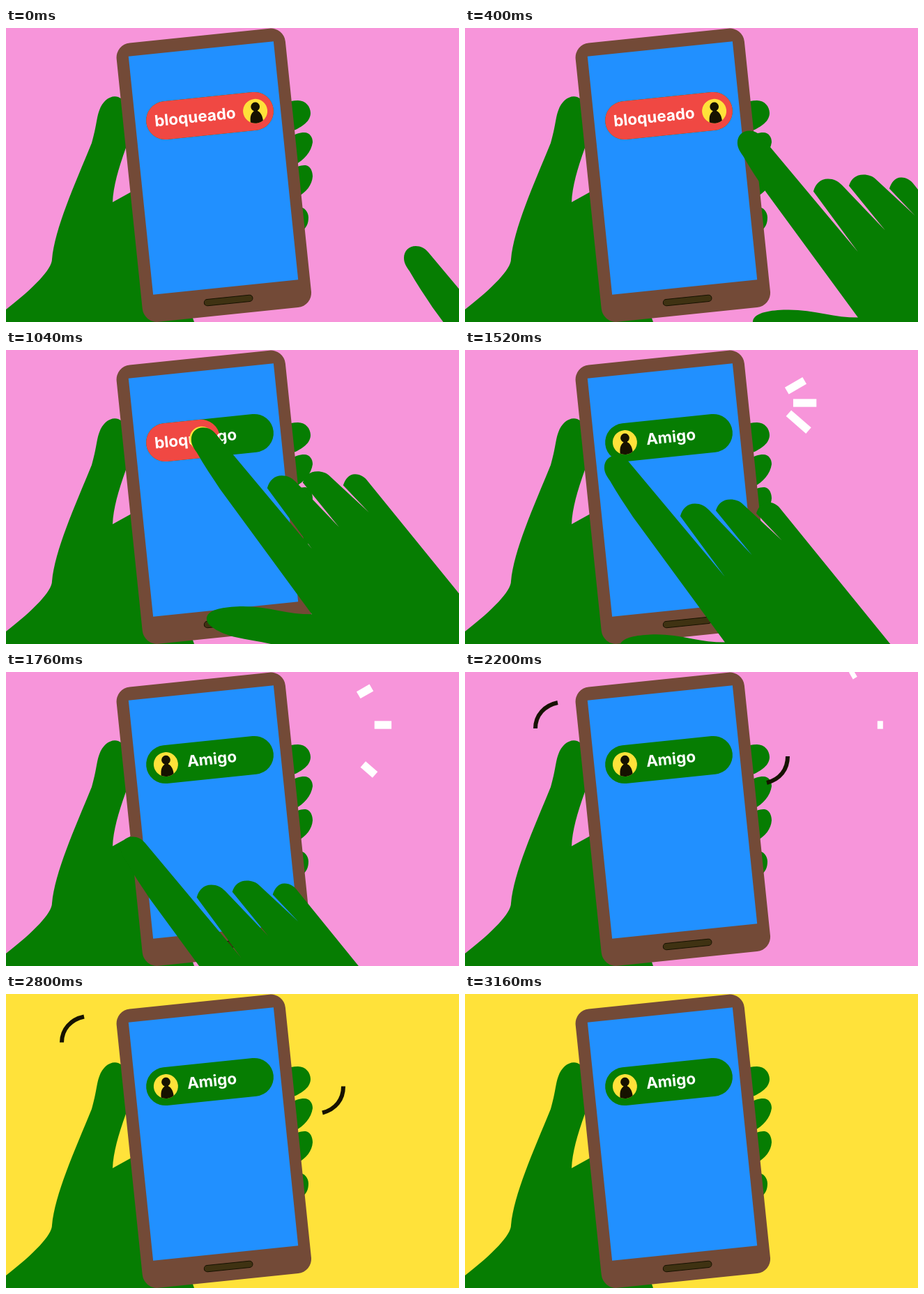
Animation of 650x422 px, one loop 3200 ms. Source, as an HTML page with a canvas:

```html
<!DOCTYPE html>
<html lang="es">
<head>
<meta charset="utf-8">
<title>Bloqueado / Amigo</title>
<style>
  html, body { margin: 0; width: 100%; height: 100%; overflow: hidden; background: #f795da; }
  canvas { display: block; width: 100%; height: 100%; }
</style>
</head>
<body>
<canvas id="stage" width="650" height="422"></canvas>
<script>
const ctx = document.getElementById('stage').getContext('2d');
const W = 650, H = 422, LOOP = 3200, STEP = 40;
const TILT = -5.9 * Math.PI / 180;
const C = {
  pink: '#f795da', yellow: '#ffe23a', green: '#067d02', blue: '#2190ff',
  brown: '#734a37', red: '#f04843', dark: '#161200', button: '#3f3212', white: '#fff'
};

const clamp = x => Math.max(0, Math.min(1, x));
const span = (t, from, to) => clamp((t - from) / (to - from));
const lerp = (a, b, p) => a + (b - a) * p;
const outQuad = p => 1 - (1 - p) ** 2;
const inOutSine = p => (1 - Math.cos(Math.PI * p)) / 2;
const inOutCubic = p => p < 0.5 ? 4 * p ** 3 : 1 - 4 * (1 - p) ** 3;

const holder = new Path2D(`M0 404 C40 373 66 346 66 332 C70 288 98 226 123 165
  C130 141 130 128 134 118 C139 104 150 96 161 99 L178 108 L172 172
  C161 203 154 227 153 250 L200 224 L270 422 L0 422 Z`);

const knuckles = new Path2D(`M400 108 C406 105 412 104 419 104 C430 104 437 113 437 122 C437 134 425 142 411 148 Z
  M408 158 C414 152 421 150 428 150 C436 150 440 157 440 164 C438 178 428 189 414 197 Z
  M412 202 C418 198 425 197 430 197 C437 198 440 206 440 213 C439 226 431 235 418 243 Z
  M416 258 C425 254 434 262 434 272 C434 281 431 287 424 292 Z`);

const pointer = new Path2D(`M567 318 L429 153 C424 147 418 144 411 144 C401 144 394 151 394 161
  C394 168 397 173 402 180 C412 198 424 215 435 232 L567 412
  C550 412 535 410 520 407 C500 403 480 400 460 401 C437 402 416 406 416 419
  C416 430 440 441 458 445 C490 452 530 455 560 475 L600 520 L890 520
  L648 222 C643 215 637 211 629 211 C620 211 615 218 612 227 L649 266
  L593 214 C588 209 582 207 575 207 C564 207 557 213 554 223 L606 287
  L544 222 C538 216 532 213 524 213 C513 213 506 220 503 231 Z`);

// Slider geometry, in the tilted space of the phone
const PILL = { left: -89, right: 94.5, mid: -75.1, r: 27.5 };
const KNOB = { from: 68.2, to: -60.7, r: 17.5 };
const CENTER = { x: 297.5, y: 201 };

const toStage = (u, v) => ({
  x: CENTER.x + u * Math.cos(TILT) - v * Math.sin(TILT),
  y: CENTER.y + u * Math.sin(TILT) + v * Math.cos(TILT)
});

const knobAt = t => lerp(KNOB.from, KNOB.to, inOutSine(span(t, 640, 1350)));

function fill(path, color) {
  ctx.fillStyle = color;
  ctx.fill(path);
}

function box(x, y, w, h, r) {
  const p = new Path2D();
  p.roundRect(x, y, w, h, r);
  return p;
}

function disc(x, y, r) {
  const p = new Path2D();
  p.arc(x, y, r, 0, 2 * Math.PI);
  return p;
}

function label(text, u, v) {
  ctx.font = '700 22.5px Inter, "Open Sans", sans-serif';
  ctx.fillStyle = C.white;
  ctx.fillText(text, u, v);
}

function background(t) {
  ctx.fillStyle = C.pink;
  ctx.fillRect(0, 0, W, H);
  const top = H * (1 - inOutCubic(span(t, 2220, 2710)));
  ctx.fillStyle = C.yellow;
  ctx.fillRect(0, top, W, H - top);
}

// A dash that runs outward: its head leads and its tail catches up
function dash(t, x, y, deg, length, time) {
  const head = length * outQuad(span(t, 1300, 1300 + time));
  const tail = length * outQuad(span(t, 1430, 1430 + time));
  if (head - tail < 0.3) return;
  ctx.save();
  ctx.translate(x, y);
  ctx.rotate(deg * Math.PI / 180);
  ctx.fillStyle = C.white;
  ctx.fillRect(tail, -5.7, head - tail, 11.4);
  ctx.restore();
}

function burst(t) {
  dash(t, 442, 70, -30, 139, 1050);
  dash(t, 445, 76, 0, 158, 1050);
  dash(t, 441, 70.5, 41, 139, 760);
}

function avatar(u) {
  ctx.save();
  ctx.translate(u, PILL.mid);
  const face = disc(0, 0, KNOB.r);
  fill(face, C.yellow);
  ctx.clip(face);
  fill(disc(0.7, -6.3, 6.4), C.dark);
  fill(new Path2D('M-2 -3 L3.5 -3 L3.5 0 C8 3 10 8 10 18 L-8.5 18 C-8.5 8 -7 3 -2 0 Z'), C.dark);
  ctx.restore();
}

function slider(t) {
  const { left, right, mid, r } = PILL;
  const u = knobAt(t);
  fill(box(left, mid - r, right - left, 2 * r, r), C.green);
  label('Amigo', -30, -68.2);

  const shrink = span(t, 1200, 1360);
  if (shrink < 1) {
    const half = r * (1 - shrink);
    const from = lerp(left, u - half, shrink);
    const to = u + (right - KNOB.from) * (1 - shrink);
    const cover = box(from, mid - half, to - from, 2 * half, half);
    ctx.save();
    fill(cover, C.red);
    ctx.clip(cover);
    label('bloqueado', -77, -67.8);
    ctx.restore();
  }
  avatar(u);
}

function phone(t) {
  ctx.save();
  ctx.translate(CENTER.x, CENTER.y);
  ctx.rotate(TILT);
  fill(box(-122, -191, 243.5, 402.5, 21), C.brown);
  ctx.fillStyle = C.blue;
  ctx.fillRect(-104.6, -172, 209.2, 344);
  const button = box(-33, 186.6, 70, 9.2, 4.6);
  fill(button, C.button);
  ctx.strokeStyle = C.dark;
  ctx.lineWidth = 1;
  ctx.stroke(button);
  slider(t);
  ctx.restore();
}

function pointerAt(t) {
  const knob = toStage(knobAt(t), PILL.mid);
  const touch = { x: knob.x - 409, y: knob.y - 160 };
  if (t < 640) {
    const p = 1 - (1 - span(t, 0, 620)) ** 1.5;
    return { x: lerp(177, touch.x, p), y: lerp(169, touch.y, p) };
  }
  const away = (Math.max(0, t - 1350) / 170) ** 1.4;
  return { x: touch.x - 14.5 * away, y: touch.y + 35 * away };
}

function pointingHand(t) {
  const { x, y } = pointerAt(t);
  if (y > 290) return;
  ctx.save();
  ctx.translate(x, y);
  fill(pointer, C.green);
  ctx.restore();
}

function shakeMarks(dx, dy) {
  ctx.strokeStyle = C.dark;
  ctx.lineWidth = 6;
  ctx.stroke(new Path2D(`M${101 - dx} ${81 - dy} C${101 - dx} ${62 - dy} ${114 - dx} ${48 - dy} ${133 - dx} ${44 - dy}`));
  ctx.stroke(new Path2D(`M${433 + dx} ${159 + dy} C${452 + dx} ${154 + dy} ${463 + dx} ${140 + dy} ${463 + dx} ${121 + dy}`));
}

function draw(t) {
  background(t);
  burst(t);
  fill(holder, C.green);
  fill(knuckles, C.green);
  phone(t);
  pointingHand(t);
  if (t >= 2120 && t < 2720) shakeMarks(0, 0);
  if (t >= 2320 && t < 2880) shakeMarks(21, 11.5);
}

let start;
function tick(now) {
  start ??= now;
  const t = (now - start) % LOOP;
  draw(Math.floor(t / STEP + 0.01) * STEP);
  requestAnimationFrame(tick);
}
draw(0);
requestAnimationFrame(tick);
</script>
</body>
</html>
```
